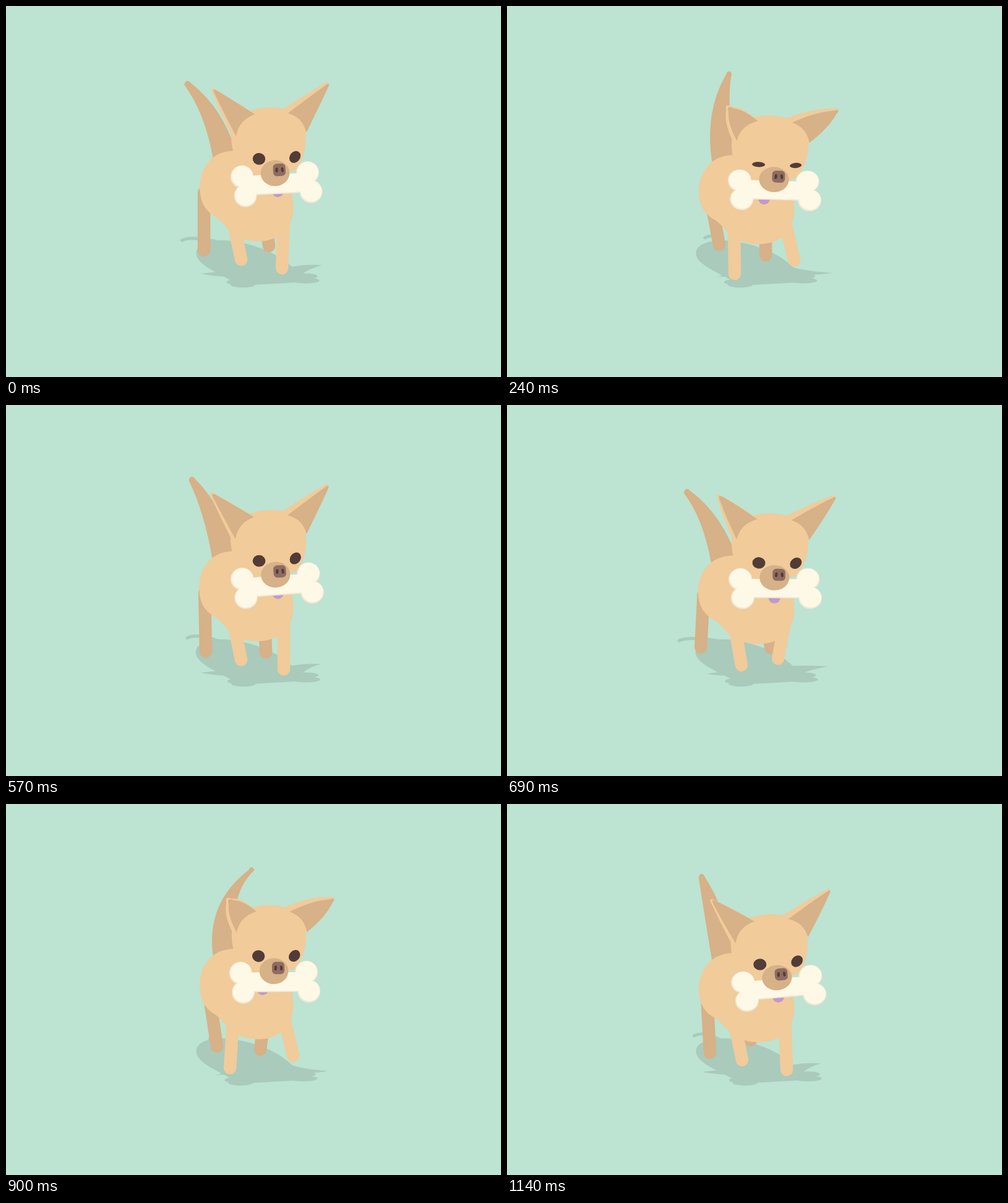
These frames come from a looping animation (800x600 px, 1.17 s). An HTML page with a canvas:

```html
<!DOCTYPE html>
<html lang="en">
<head>
<meta charset="utf-8">
<title>Trotting puppy</title>
<style>
html, body { margin: 0; height: 100%; overflow: hidden; background: #bde3d2; }
canvas { display: block; width: 800px; height: 600px; }
</style>
</head>
<body>
<canvas id="stage" width="800" height="600"></canvas>
<script>
const ctx = document.getElementById('stage').getContext('2d');
const LOOP = 1170, STEP = 30, STRIDE = 600;
const C = {
  bg: '#bde3d2', shadow: '#aacabc', fur: '#f1cb9a', dark: '#d7b187', eye: '#523c37',
  nose: '#8f6b61', nostril: '#553b37', bone: '#fef8e6', rim: '#f0e8d4', tag: '#c199c9'
};

// Foot paths over one stride: [time, x, y]
const FRONT = [[0, 380, 410], [120, 378, 425], [180, 373, 437], [240, 368, 433], [300, 362, 427],
  [420, 353, 411], [480, 359, 424], [540, 380, 414], [570, 380, 412]];
const BACK_LEFT = [[0, 320, 395], [180, 313, 389], [240, 343, 386], [300, 341, 392],
  [420, 341, 398], [540, 328, 402], [570, 323, 398.5]];
const BACK_RIGHT = [[0, 425, 388], [180, 425, 400], [240, 418, 403], [300, 411, 397],
  [420, 398, 376], [540, 394, 382], [570, 420, 400]];
const BLINK = [[150, 1], [240, 0.45], [280, 0.15], [420, 0.88], [460, 1]];

const wave = (t, peak, period = STRIDE) => Math.cos(2 * Math.PI * (t - peak) / period);
const mix = (a, b, k) => a + (b - a) * k;

// Smooth cyclic curve through the keys
function along(keys, time) {
  const t = (time % STRIDE + STRIDE) % STRIDE, n = keys.length;
  const key = i => {
    const turn = Math.floor(i / n), k = keys[i - turn * n];
    return [k[0] + turn * STRIDE, k[1], k[2]];
  };
  let i = n - 1;
  while (keys[i][0] > t) i--;
  const [p, a, b, q] = [key(i - 1), key(i), key(i + 1), key(i + 2)];
  const span = b[0] - a[0], u = (t - a[0]) / span, u2 = u * u, u3 = u2 * u;
  return [1, 2].map(c => {
    const ma = (b[c] - p[c]) / (b[0] - p[0]) * span;
    const mb = (q[c] - a[c]) / (q[0] - a[0]) * span;
    return (2 * u3 - 3 * u2 + 1) * a[c] + (u3 - 2 * u2 + u) * ma
      + (3 * u2 - 2 * u3) * b[c] + (u3 - u2) * mb;
  });
}

function openness(t) {
  if (t <= BLINK[0][0] || t >= BLINK[BLINK.length - 1][0]) return 1;
  const i = BLINK.findIndex(k => k[0] > t), a = BLINK[i - 1], b = BLINK[i];
  return mix(a[1], b[1], (t - a[0]) / (b[0] - a[0]));
}

function fill(color, path) {
  ctx.fillStyle = color;
  ctx.fill(typeof path === 'string' ? new Path2D(path) : path);
}

function oval(color, x, y, rx, ry = rx, tilt = 0) {
  const path = new Path2D();
  path.ellipse(x, y, rx, ry, tilt, 0, 7);
  fill(color, path);
}

function line(color, width, d) {
  ctx.strokeStyle = color;
  ctx.lineWidth = width;
  ctx.lineCap = 'round';
  ctx.stroke(new Path2D(d));
}

const leg = (color, hip, foot) => line(color, 20.5, `M${hip} L${foot}`);

function drawShadow(t, pose) {
  const { bounce, tail, lag } = pose, left = 305 - 2.5 * bounce;
  const tipX = 310 + 28 * tail - 8 * tail * tail, tipY = 374 + 8 * tail * tail;
  fill(C.shadow, `M${left} 400 C${left} 385 330 376 365 380 C405 386 440 400 462 422
    L478 436 L470 447 L400 451 L362 443 C343 432 ${left} 418 ${left} 400Z`);
  line(C.shadow, 5, `M${tipX + 2} ${tipY} Q${tipX + 18} ${tipY - 8} 345 382`);
  const earL = 328 - 14 * lag, earR = 516 + 10 * wave(t, 200);
  const earLY = 436 - 3 * lag, earRY = 425.5 - 6.5 * lag;
  fill(C.shadow, `M${earL} ${earLY} Q345 ${earLY - 4} 370 429 L385 442 L358 438 Q335 437 ${earL} ${earLY}Z`);
  fill(C.shadow, `M${earR} ${earRY} Q485 ${earRY - 2} 460 422 L465 437 L478 434 Q490 ${earRY + 5} ${earR} ${earRY}Z`);
  const shift = -1.2 * (pose.angle + 2.6);
  oval(C.shadow, 377 + shift, 446.5, 21, 5);
  oval(C.shadow, 382 + shift, 450.5, 20, 5);
  oval(C.shadow, 483 + shift, 437, 20, 4.5);
  oval(C.shadow, 483 + shift, 444, 23, 4.5);
}

function drawTail(bounce, s) {
  const top = 242.5 + 8 * bounce, sway = -4 * bounce;
  const x = 335 + 73 * s + 15 * s * s - 13 * s * s * s, y = top - 131 - 12 * s + 16 * s * s;
  const tipL = `${x - 4.5} ${y + 3 - s}`, tipR = `${x + 4.5} ${y + 1 + 2 * s}`;
  fill(C.dark, `M${331 + sway} ${top + 14} Q${318 + sway} ${top - 68 - 8 * s} ${tipL}
    C${x - 3.5} ${y - 3.5} ${x + 2.5} ${y - 4} ${tipR}
    Q${351.5 + sway} ${top - 76 - 12 * s} 375 ${top + 14}Z`);
}

function drawBody(bounce) {
  ctx.save();
  ctx.translate(465, 386 + 5.5 * bounce);
  ctx.scale(1 + 0.024 * bounce, 1 - 0.0174 * bounce);
  ctx.translate(-465, -385.5);
  fill(C.fur, `M375 241.5 C350 241 336 246 323 260 C312 273 309 290 309.5 302
    C310.5 325 319 337 335 346 C347 354 352 363 362 371 C375 381 390 385.5 404 385.5
    C430 385.5 447 376 456 361 C463 350 465 338 464 326 L460 280 Z`);
  ctx.restore();
}

// Triangle with a rounded tip and bulging sides
function ear(color, from, tip, to, bulge, base) {
  const side = (p, sign) => {
    const dx = tip[0] - p[0], dy = tip[1] - p[1], len = Math.hypot(dx, dy);
    return {
      mid: [(p[0] + tip[0]) / 2 + sign * bulge * dy / len, (p[1] + tip[1]) / 2 - sign * bulge * dx / len],
      near: [tip[0] - dx * 13 / len, tip[1] - dy * 13 / len]
    };
  };
  const turn = (tip[0] - from[0]) * (to[1] - tip[1]) > (tip[1] - from[1]) * (to[0] - tip[0]) ? 1 : -1;
  const a = side(from, turn), b = side(to, -turn);
  fill(color, `M${from} Q${a.mid} ${a.near} Q${tip} ${b.near} Q${b.mid} ${to} ${base}Z`);
}

function eye(x, y, rx, ry, tilt, lids) {
  ctx.save();
  ctx.translate(x, y);
  ctx.scale(1, lids);
  oval(C.eye, 0, 0, rx, ry, tilt);
  ctx.restore();
}

function bone(color, r, half) {
  for (const [x, y] of [[-55, -15], [-51, 16], [51, -16], [55, 15]]) oval(color, x, y, r);
  ctx.fillRect(-50, -half, 100, 2 * half);
}

function drawHead(t, pose, lids) {
  const { angle } = pose, lift = wave(t, 168, STRIDE / 2), drop = (1 + lift) / 2;
  const swing = wave(t, 0), bulge = 4.5 - 4 * swing;
  const tipL = [-90 - 10 * swing, -153.5 - 12 * swing];
  const tipR = [99 - 2.5 * swing, -152.5 - 12.5 * swing];
  ctx.save();
  ctx.translate(434 - 1.05 * angle, 297.5 + 10 * lift);
  ctx.rotate(angle * Math.PI / 180);
  ctx.scale(1 + 0.065 * drop, 1 - 0.06 * drop);

  ear(C.fur, [-67, -80], tipL, [-32, -118], bulge, 'L-50 -85');
  ear(C.fur, [16, -121], tipR, [52, -82], bulge, 'L35 -90');
  fill(C.fur, `M-10 -125 C27 -125 51 -108 51 -78 C51 -50 44 -35 30 -20 L-50 -20
    C-62 -35 -69 -55 -69 -75 C-69 -105 -45 -125 -10 -125Z`);
  ear(C.dark, [-61, -81], [tipL[0] + 3, tipL[1] + 2.5], [-29, -115], bulge * 0.8, 'C-48 -109 -57 -98 -61 -81');
  ear(C.dark, [24.5, -114], [tipR[0] + 0.5, tipR[1] + 2.5], [52.5, -81], bulge * 0.8, 'C49 -98 41 -108 24.5 -114');

  eye(-26, -42.5, 10.2, 9.5, 0.12, lids);
  eye(32, -42.5, 10.3, 8.3, -0.85, lids);

  bone(C.rim, 18.5, 16);
  ctx.save();
  ctx.translate(0.4, -0.9);
  bone(C.bone, 17, 15);
  ctx.restore();

  oval(C.dark, -1.3, -18, 23.3, 21);
  const nose = new Path2D();
  nose.roundRect(-4.3, -33, 20, 20, 6);
  fill(C.nose, nose);
  oval(C.nostril, 1.5, -23, 2.1, 4, 0.1);
  oval(C.nostril, 10.7, -23, 2.1, 4, -0.1);
  ctx.restore();
}

function draw(time) {
  const t = time % STRIDE, bounce = wave(t, 158, STRIDE / 2);
  const pose = {
    bounce,
    angle: -1.7 + 3.9 * wave(t, 183),
    tail: wave(t, 360),
    lag: wave(t, -20)
  };
  const backLeft = along(BACK_LEFT, t);
  const [rx, ry] = along(FRONT, t + STRIDE / 2);

  ctx.fillStyle = C.bg;
  ctx.fillRect(0, 0, 800, 600);
  drawShadow(t, pose);
  drawTail(bounce, pose.tail);
  leg(C.dark, [mix(320, backLeft[0], 0.35), 306 + 4 * bounce], backLeft);
  leg(C.dark, [418, 345 + 4 * bounce], along(BACK_RIGHT, t));
  leg(C.fur, [367, 352 + 5 * bounce], along(FRONT, t));
  leg(C.fur, [449, 348 + 5 * bounce], [rx + 84, ry - 3]);
  drawBody(bounce);
  oval(C.tag, 427 + 12.5 * pose.lag, 311.5 + 12.5 * wave(t, 165, STRIDE / 2), 9.5);
  drawHead(t, pose, openness(time));
}

function tick(now) {
  draw(Math.floor(now % LOOP / STEP) * STEP);
  requestAnimationFrame(tick);
}
tick(0);
</script>
</body>
</html>
```
